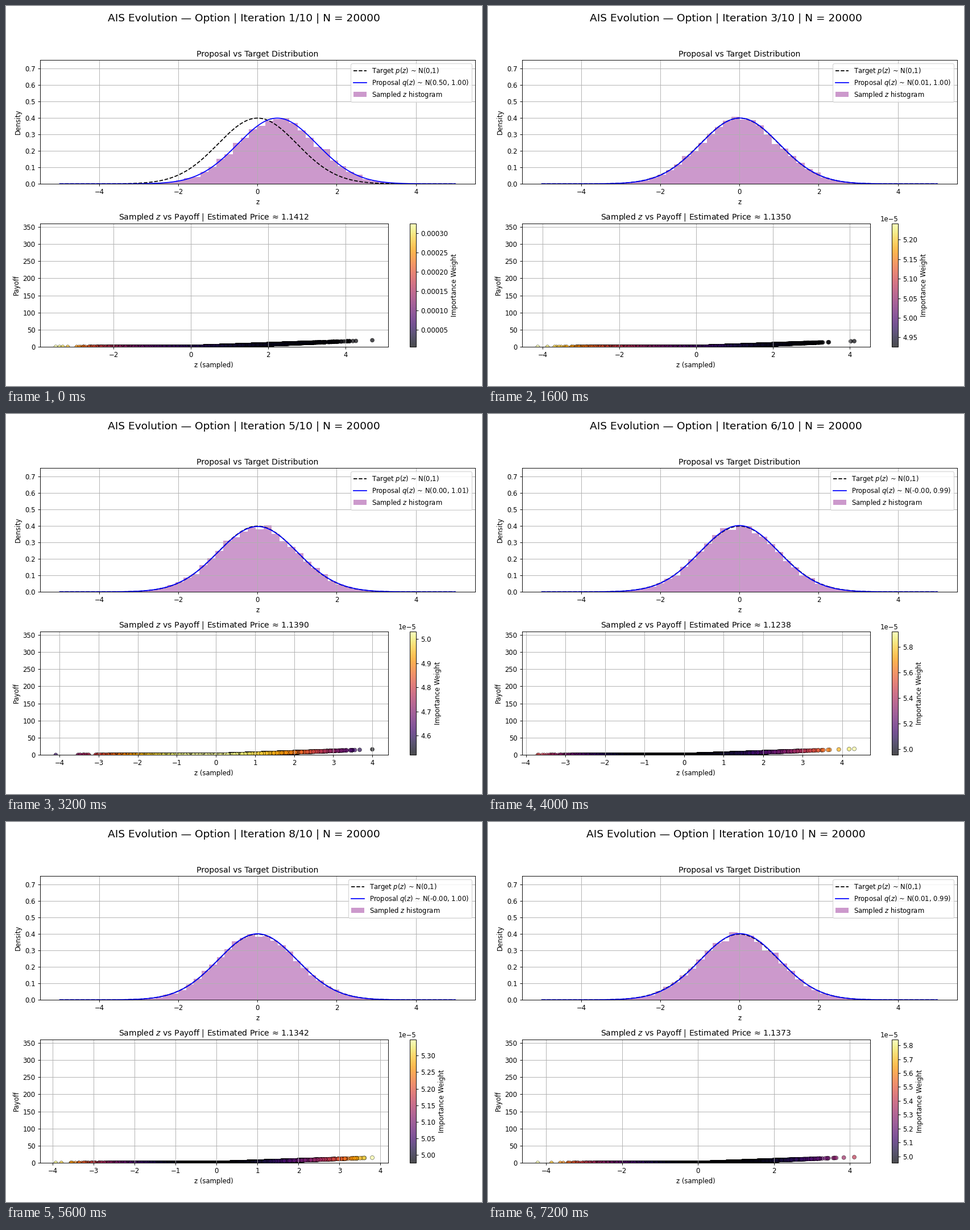
These frames come from a looping animation (837x669 px, 8 s). A matplotlib script:

```python
import numpy as np
import matplotlib.pyplot as plt
from matplotlib.animation import FuncAnimation

W, H = 837, 669
N = 20000

# Per iteration: proposal mean and deviation, price, smallest and largest sample
RUNS = [
    (0.5, 1.0, 1.1412, -3.495, 4.695),
    (0.0065, 1.0005, 1.1324, -3.77, 3.88),
    (0.0075, 0.999, 1.135, -4.13, 4.12),
    (0.004, 0.9975, 1.148, -4.13, 4.16),
    (0.003, 1.006, 1.139, -4.1, 4.0),
    (-0.004, 0.9915, 1.1238, -3.7, 4.31),
    (-0.003, 0.996, 1.13, -4.05, 4.0),
    (-0.001, 0.9953, 1.1342, -3.93, 3.8),
    (0.004, 1.0001, 1.1344, -3.84, 3.94),
    (0.0086, 0.993, 1.1373, -4.22, 4.12),
]

fig = plt.figure(figsize=(10, 7.993), dpi=83.7)


def add_axes(left, right, top, bottom):
    return fig.add_axes([left / W, 1 - bottom / H, (right - left) / W, (bottom - top) / H])


def normal(x, mu=0.0, sigma=1.0):
    return np.exp(-0.5 * ((x - mu) / sigma) ** 2) / (sigma * np.sqrt(2 * np.pi))


def payoff(z):
    return 100 * np.maximum(np.exp(0.039 * (z - 0.1)) - 1, 0)


def draw_samples(seed, mu, sigma, low, high):
    """Normal samples that span exactly low to high, in random order."""
    rng = np.random.default_rng(seed)
    z = rng.normal(mu, sigma, N + 500)
    z = z[(z > low) & (z < high)][:N - 2]
    return rng.permutation(np.append(z, [low, high]))


def draw_density(mu, sigma, z):
    ax = add_axes(59.6, 825, 95.5, 313.2)
    x = np.linspace(-5, 5, 500)
    ax.plot(x, normal(x), "k--", label="Target $p(z)$ ~ N(0,1)")
    ax.plot(x, normal(x, mu, sigma), "b-",
            label=f"Proposal $q(z)$ ~ N({mu:.2f}, {sigma:.2f})")
    ax.hist(z, bins=40, density=True, color="purple", alpha=0.4,
            label="Sampled $z$ histogram")
    ax.set(xlim=(-5.5, 5.5), ylim=(0, 0.75), xlabel="z", ylabel="Density",
           title="Proposal vs Target Distribution")
    ax.grid(True)
    ax.legend(loc="upper right", labelspacing=0.33)


def draw_payoff(mu, sigma, price, z):
    ax = add_axes(59.6, 671.9, 382.6, 600.3)
    cax = add_axes(710.2, 721.1, 382.6, 600.3)
    weight = normal(z) / normal(z, mu, sigma) / N
    dots = ax.scatter(z, payoff(z), c=weight, cmap="inferno", alpha=0.7,
                      edgecolors="k", linewidths=0.5)
    pad = 0.05 * np.ptp(z)
    ax.set(xlim=(z.min() - pad, z.max() + pad), ylim=(0, 360),
           xlabel="z (sampled)", ylabel="Payoff",
           title=f"Sampled $z$ vs Payoff | Estimated Price ≈ {price:.4f}")
    ax.grid(True)
    fig.colorbar(dots, cax=cax, label="Importance Weight")


def update(i):
    mu, sigma, price, low, high = RUNS[i]
    z = draw_samples(40 + i, mu, sigma, low, high)
    fig.clear()
    fig.suptitle(f"AIS Evolution — Option | Iteration {i + 1}/{len(RUNS)} | N = {N}",
                 fontsize=16)
    draw_density(mu, sigma, z)
    draw_payoff(mu, sigma, price, z)
    return []


anim = FuncAnimation(fig, update, frames=len(RUNS), interval=800, repeat=True,
                     repeat_delay=0, blit=False)
plt.show()
```
